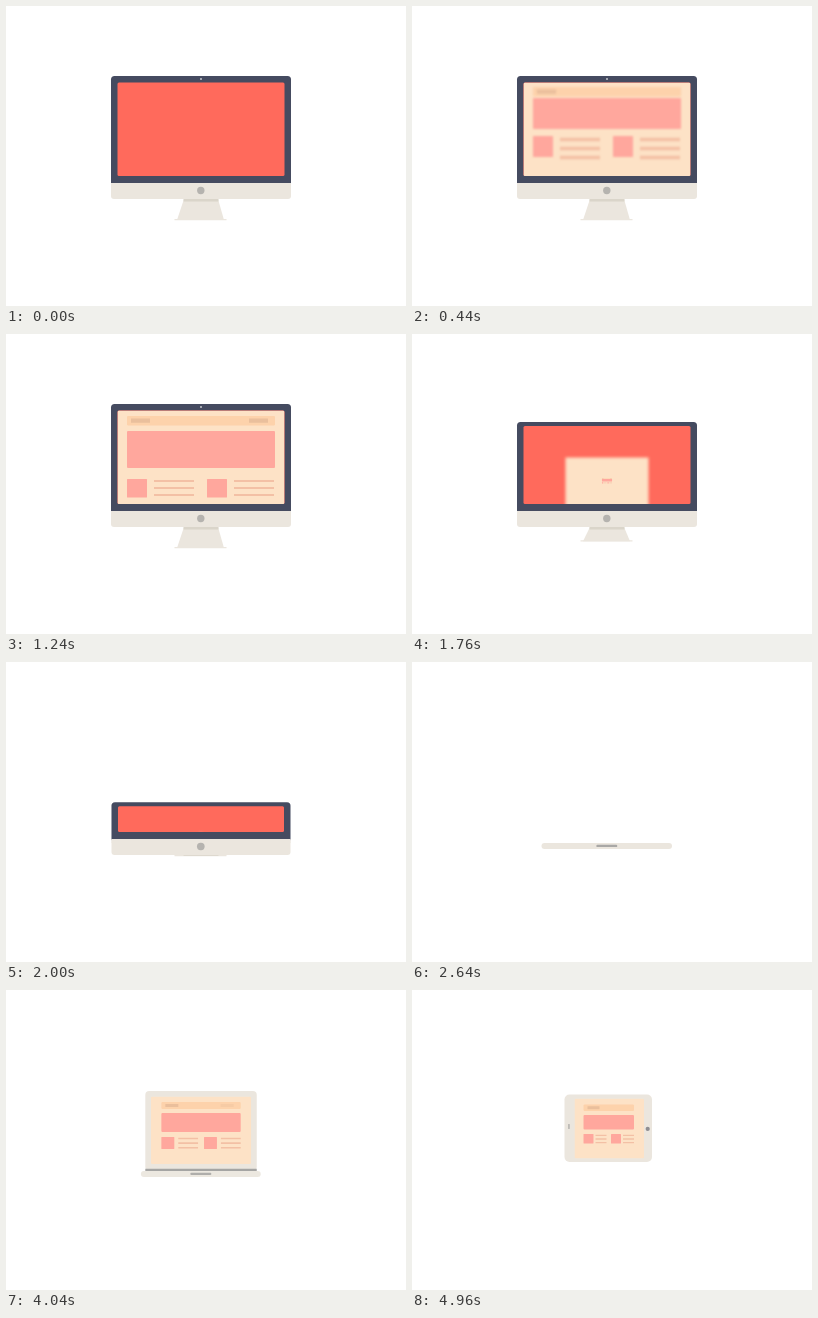
Animation, 400 px wide and 300 px high, one loop 5000 ms. Source, as an HTML page with a canvas:

```html
<!DOCTYPE html>
<html lang="en">
<head>
<meta charset="utf-8">
<title>Responsive devices</title>
<style>
  html, body { margin: 0; width: 100%; height: 100%; overflow: hidden; background: #fff; }
  canvas { display: block; width: 400px; height: 300px; }
</style>
</head>
<body>
<canvas id="stage"></canvas>
<script>
const LOOP = 5000;
const canvas = document.getElementById('stage');
const ctx = canvas.getContext('2d');
const ratio = window.devicePixelRatio || 1;
canvas.width = 400 * ratio;
canvas.height = 300 * ratio;

const color = {
  bezel: '#454b60', red: '#ff6a5c', cream: '#fde2c6', shell: '#ebe6de',
  nav: '#fdd2ab', label: '#eabf9c', pink: '#ffa79d', line: '#f3c0a5',
  shade: '#dad5ca', hinge: '#a5a5a3', metal: '#a9a8a6'
};

const mix = (a, b, p) => a + (b - a) * p;
const blend = (a, b, p) =>
  Object.fromEntries(Object.keys(a).map(k => [k, mix(a[k], b[k], p)]));
const span = (t, from, to) => Math.min(1, Math.max(0, (t - from) / (to - from)));
const ease = (t, from, to) => { const u = span(t, from, to); return u * u * (3 - 2 * u); };
const easeOut = (t, from, to) => 1 - (1 - span(t, from, to)) ** 3;

// Page layouts: vertical values are offsets from the top of the page
const wide = {
  x: 121, y: 82, w: 148, nav: 9.5, label: 19, hero: 15, heroH: 37, row: 63,
  box: 20, boxH: 18.5, col: 80, text: 27, len: 40, pitch: 7, thick: 2, right: 1
};
const arriving = {
  ...wide, y: 81, hero: 11, heroH: 31, row: 49, boxH: 21, pitch: 9, thick: 3.5, right: 0
};
const medium = {
  x: 155, y: 112, w: 80, nav: 7, label: 13, hero: 11, heroH: 19, row: 35,
  box: 13, boxH: 12, col: 43, text: 17, len: 20, pitch: 4.6, thick: 1.6, right: 0.4
};
const small = {
  x: 171.5, y: 114.5, w: 50.5, nav: 6.5, label: 12, hero: 10.5, heroH: 14.5, row: 29.5,
  box: 10, boxH: 9.5, col: 27.5, text: 12, len: 11, pitch: 3.6, thick: 1.4, right: 0
};

function rect(x, y, w, h, fill, radius = 0) {
  if (w <= 0 || h <= 0) return;
  ctx.fillStyle = fill;
  ctx.beginPath();
  ctx.roundRect(x, y, w, h, Math.min(radius, w / 2, h / 2));
  ctx.fill();
}

function page(p) {
  rect(p.x, p.y, p.w, p.nav, color.nav, 1);
  const labelY = p.y + p.nav * 0.27, labelH = p.nav * 0.45;
  rect(p.x + 4, labelY, p.label, labelH, color.label);
  const alpha = ctx.globalAlpha;
  ctx.globalAlpha = alpha * p.right;
  rect(p.x + p.w - p.label - 7, labelY, p.label, labelH, color.label);
  ctx.globalAlpha = alpha;
  rect(p.x, p.y + p.hero, p.w, p.heroH, color.pink, 1);
  for (const x of [p.x, p.x + p.col]) {
    const y = p.y + p.row;
    rect(x, y, p.box, p.boxH, color.pink, 0.5);
    for (let i = 0; i < 3; i++) {
      rect(x + p.text, y + p.thick / 2 + i * p.pitch, p.len, p.thick, color.line);
    }
  }
}

// A cream sheet grows from the bottom of the screen; the page grows from its centre.
function display(s, sheet, content, layout, blur = 0) {
  if (s.h <= 0 || sheet <= 0) return;
  ctx.save();
  ctx.beginPath();
  ctx.roundRect(s.x, s.y, s.w, s.h, 1.5);
  ctx.clip();
  const w = s.w * sheet, h = s.full * sheet;
  const bottom = s.y + s.h, cx = s.x + s.w / 2, cy = bottom - h / 2;
  if (sheet < 1) ctx.filter = `blur(${1.5 * ratio}px)`;
  rect(cx - w / 2, bottom - h, w, h + (sheet < 1 ? 4 : 0), color.cream);
  ctx.filter = blur > 0.05 ? `blur(${blur * ratio}px)` : 'none';
  if (content > 0.01) {
    ctx.translate(cx, cy);
    ctx.scale(content, content);
    ctx.translate(-cx, -(bottom - s.full / 2));
    page(layout);
  }
  ctx.restore();
}

function stand(h) {
  if (h <= 0.2) return;
  ctx.fillStyle = color.shell;
  ctx.beginPath();
  ctx.moveTo(178, 193);
  ctx.lineTo(212, 193);
  ctx.lineTo(218, 193 + h);
  ctx.lineTo(171, 193 + h);
  ctx.fill();
  rect(168.5, 193 + h - 1, 52, 1.3, color.shell);
  rect(177.5, 193, 35, Math.min(2.5, h), color.shade);
}

function desktop(t) {
  stand(21 * (1 - ease(t, 1580, 2060)));
  const top = mix(70, 178, ease(t, 1580, 2280));
  const morph = ease(t, 1960, 2450);
  const left = mix(105, 129.5, morph), right = mix(285, 260, morph);
  if (top < 177.5) {
    rect(left, top, right - left, 180 - top, color.bezel, 3.5);
    const inset = mix(6.5, 4, ease(t, 1580, 1760));
    const screen = { x: left + 6.5, y: top + inset, w: right - left - 13, h: 170 - top - inset, full: 93.5 };
    rect(screen.x, screen.y, screen.w, screen.h, color.red, 1.5);
    const leaving = t > 1200;
    const sheet = leaving ? 1 - ease(t, 1500, 2020) : ease(t, 40, 360);
    const content = leaving ? 1 - ease(t, 1240, 1860) : easeOut(t, 120, 420);
    const settle = ease(t, 440, 960);
    display(screen, sheet, content, blend(arriving, wide, settle), 1.3 * (1 - settle));
    if (top < 85) rect(194, 72, 2, 2, '#c5c6cb', 1);
  }
  const y = mix(177, 181, morph), bottom = mix(193, 187, morph);
  rect(left, y, right - left, bottom - y, color.shell, 3);
  if (morph < 0.6) rect(left, y, right - left, 4, color.shell);
  const bw = mix(7.4, 21, morph), bh = mix(7.4, 2.4, morph);
  rect(194.8 - bw / 2, mix(184.5, 183.9, morph) - bh / 2, bw, bh, mix(0, 1, morph) > 0.5 ? color.metal : '#b5b3af', 4);
}

function portable(t) {
  const open = easeOut(t, 2860, 3420);
  const morph = ease(t, 4000, 4460);
  const lid = {
    x: mix(139, 152.5, morph), y: mix(mix(181, 101, open), 104.5, morph),
    w: mix(112, 87.5, morph), bottom: mix(181, 172, morph)
  };
  rect(lid.x, lid.y, lid.w, lid.bottom - lid.y, color.shell, mix(4, 5, morph));
  if (open > 0.03 && morph < 0.3) rect(lid.x, 178.7, lid.w, 2.5 * (1 - morph / 0.3), color.hinge);

  const screen = {
    x: mix(144.5, 162.5, morph), y: mix(106.5, 108.5, morph),
    w: mix(101, 69.5, morph), h: mix(67.5, 60, morph)
  };
  screen.full = screen.h;
  display(screen, ease(t, 3420, 3780), easeOut(t, 3540, 3940), blend(medium, small, morph));

  const base = 1 - ease(t, 4000, 4240);
  if (base > 0.01) {
    const settle = ease(t, 2860, 3380);
    const left = mix(129.5, 133.5, settle), right = mix(260, 256, settle);
    const w = (right - left) * mix(0.72, 1, base);
    ctx.globalAlpha = base;
    rect(194.8 - w / 2, 181, w, 6.5 * base, color.shell, 3);
    rect(184.3, 182.7, 21, 2.4 * base, color.metal, 1);
    ctx.globalAlpha = 1;
  }
  ctx.globalAlpha = ease(t, 4240, 4460);
  rect(233.6, 136.8, 4.2, 4.2, '#8e8e92', 2.1);
  rect(156.3, 134, 1.3, 5, '#aaa8a6', 0.6);
  ctx.globalAlpha = 1;
}

function draw(now) {
  const t = (now - start) % LOOP;
  ctx.setTransform(ratio, 0, 0, ratio, 0, 0);
  ctx.fillStyle = '#fff';
  ctx.fillRect(0, 0, 400, 300);
  (t < 2860 ? desktop : portable)(t);
}

function tick(now) {
  draw(Math.max(now, start));
  requestAnimationFrame(tick);
}

const start = performance.now();
draw(start);
requestAnimationFrame(tick);
</script>
</body>
</html>
```
